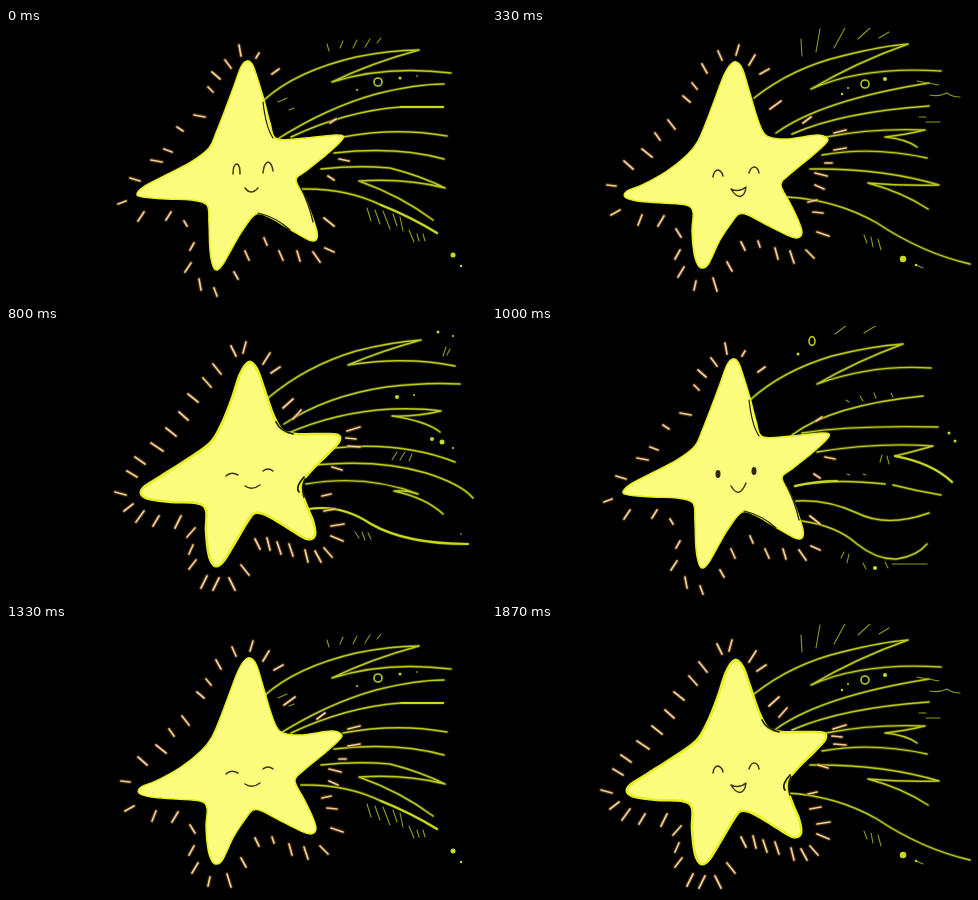
Write an HTML page that moves like this. It is 480 px wide and 270 px high and loops after 1990 ms.

```html
<!DOCTYPE html>
<html lang="en">
<head>
<meta charset="utf-8">
<title>Shooting star</title>
<style>
html, body { margin: 0; width: 100%; height: 100%; overflow: hidden; background: #000; }
svg { display: block; width: 100%; height: 100%; }
path { fill: none; stroke-linecap: round; stroke-linejoin: round; }
.trail .glow { stroke: #6c7400; stroke-width: 3.2; opacity: .5; }
.trail .line { stroke: #bccb1c; stroke-width: 1.4; }
.trail .bold { stroke: #c9da1e; stroke-width: 2.2; }
.trail .tick { stroke: #8e9a18; stroke-width: 1.1; }
.trail .dot { stroke: #c9da1e; }
.spark .glow { stroke: #7a4a14; stroke-width: 4; opacity: .5; }
.spark .line { stroke: #f0d09a; stroke-width: 1.7; }
.body { fill: #fcfc7c; stroke: #e6f01c; }
.gap { stroke: #1c1c00; }
.face path { stroke: #3b3810; stroke-width: 1.5; }
.face .eye { fill: #2c2a0c; stroke: none; }
</style>
</head>
<body>
<svg viewBox="0 0 480 270" preserveAspectRatio="none"></svg>
<script>
const NS = 'http://www.w3.org/2000/svg';
const svg = document.querySelector('svg');

function add(parent, tag, attrs) {
  const el = document.createElementNS(NS, tag);
  for (const key in attrs) el.setAttribute(key, attrs[key]);
  return parent.appendChild(el);
}
const path = (g, cls, d, width) => {
  const el = add(g, 'path', { class: cls, d });
  if (width) el.style.strokeWidth = width;
};
const layer = cls => add(svg, 'g', { class: cls, visibility: 'hidden' });

// Closed smooth curve through a few points
function blob(text) {
  const v = text.split(/[ ,]+/).map(Number), n = v.length / 2;
  const at = (i, k) => v[((i + n) % n) * 2 + k];
  let d = `M${v[0]} ${v[1]}`;
  for (let i = 0; i < n; i++) {
    const c = [];
    for (const k of [0, 1]) {
      c[k] = at(i, k) + (at(i + 1, k) - at(i - 1, k)) / 6;
      c[k + 2] = at(i + 1, k) - (at(i + 2, k) - at(i, k)) / 6;
    }
    d += `C${c} ${at(i + 1, 0)} ${at(i + 1, 1)}`;
  }
  return d + 'Z';
}

// dots: [x, y, diameter]
function makeTrail({ lines, bold, ticks, dots, ring }) {
  const g = layer('trail');
  path(g, 'glow', lines + bold);
  path(g, 'line', lines);
  path(g, 'bold', bold);
  path(g, 'tick', ticks);
  for (const [x, y, size] of dots) path(g, 'dot', `M${x} ${y}h.01`, size);
  if (ring) add(g, 'ellipse', { cx: ring[0], cy: ring[1], rx: ring[2], ry: ring[3],
    fill: 'none', stroke: '#bccb1c', 'stroke-width': 1.6 });
  return g;
}

function makeStar({ shape, edge, gap, gapWidth, sparks }) {
  const g = layer('star');
  const s = add(g, 'g', { class: 'spark' });
  path(s, 'glow', sparks);
  path(s, 'line', sparks);
  path(g, 'body', blob(shape), edge);
  if (gap) path(g, 'gap', gap, gapWidth);
  return g;
}

function makeFace({ lines, eyes = [] }) {
  const g = layer('face');
  path(g, '', lines);
  for (const [cx, cy] of eyes) add(g, 'ellipse', { class: 'eye', cx, cy, rx: 2.5, ry: 3.9 });
  return g;
}

const trails = [
  {
    lines: 'M258 72Q290 43 350 29Q385 22 413 22Q365 35 326 54Q380 37 445 45' +
      'M270 112Q320 80 370 66Q410 56 438 56M285 109Q340 83 395 79L437 79' +
      'M337 109Q390 99 441 108M328 125Q390 118 438 131' +
      'M315 141Q350 137 384 140Q415 148 439 160Q400 150 353 153Q395 168 427 192' +
      'M295 161Q340 160 375 177',
    bold: 'M395 79L437 79M375 177Q405 189 431 205',
    ticks: 'M321 16l2 7M337 13l-3 7M351 12l-4 8M364 11l-5 8M371 15l4 -5' +
      'M361 180l4 13M369 182l5 14M377 183l7 18M387 186l4 12M394 189l3 14' +
      'M403 202l5 12M411 206l2 7M417 206l2 7M272 74l9 -4M283 82l5 -2',
    dots: [[394, 50, 3], [351, 62, 2], [411, 48, 1.6], [447, 227, 5], [455, 238, 2.4]],
    ring: [372, 54, 4, 4]
  },
  {
    lines: 'M262 70Q300 40 350 28Q390 18 416 16Q365 34 319 61Q370 38 449 43' +
      'M284 105Q330 72 437 55M300 106Q350 84 437 78' +
      'M334 109Q380 100 433 102Q412 107 393 109Q414 111 425 119' +
      'M330 127Q380 118 435 130M318 141Q390 140 447 157Q410 158 376 155Q410 164 436 181' +
      'M295 169Q345 172 385 195Q430 225 478 236',
    bold: '',
    ticks: 'M309 11l1 17M328 1l-4 23M353 0l-11 20M378 0l-12 11M387 10l10 -6' +
      'M425 53l22 4M438 67q8 2 17 -2q5 4 13 4M427 89h7M434 94h14' +
      'M372 207l3 8M379 209l2 10M386 211l3 11M424 237l7 3',
    dots: [[393, 51, 4], [356, 60, 2], [350, 66, 2.4], [411, 231, 6.5], [424, 237, 2.6]],
    ring: [373, 56, 4, 4]
  },
  {
    lines: 'M262 72Q300 40 350 25Q385 16 415 14Q375 25 342 39Q400 30 449 40' +
      'M278 98Q320 70 380 61Q420 56 454 58' +
      'M280 108Q330 86 385 83Q415 82 435 85Q410 91 386 90Q420 95 434 106' +
      'M328 122Q395 115 449 136M300 140Q370 132 420 147Q455 158 467 172' +
      'M300 158Q360 148 412 168Q400 164 388 165Q420 172 437 188',
    bold: 'M303 183Q335 178 365 198Q400 218 462 218',
    ticks: 'M440 21l-3 9M444 23l-3 6M391 126l-5 8M399 126l-5 8M406 128l-3 7' +
      'M349 206l4 6M356 206l3 8M362 207l3 6',
    dots: [[432, 6, 3], [447, 10, 2], [391, 71, 4], [408, 69, 2],
      [426, 113, 4], [436, 116, 5], [447, 122, 2], [455, 208, 1.6]]
  },
  {
    lines: 'M258 74Q290 45 340 30Q380 20 411 18Q365 35 325 58Q380 38 439 42' +
      'M300 109Q340 79 431 70M310 107Q360 99 446 101' +
      'M325 126Q385 116 441 120Q420 126 403 130' +
      'M303 160Q340 152 393 158M401 159Q425 165 449 169' +
      'M304 175Q335 173 365 187Q395 202 437 187' +
      'M310 195Q345 200 365 218Q385 234 405 233Q425 230 435 218',
    bold: 'M403 130Q440 137 460 156M303 160Q325 155 345 155',
    ticks: 'M343 8l12 -9M372 7l13 -8M354 74l3 2M368 70l3 5M382 67l2 5M399 67l2 4' +
      'M390 129l-2 7M395 130l2 8M355 148l3 1M371 148l3 1M352 226l-3 6M357 228l-2 9' +
      'M371 237l3 6M393 236l3 6M400 238h35',
    dots: [[306, 28, 3], [457, 107, 3], [463, 115, 3], [383, 242, 4]],
    ring: [320, 15, 3, 4.4]
  }
].map(makeTrail);

const stars = [
  {
    shape: '241 33,235 39,228 58,219 82,210 105,203 120,185 134,160 147,139 158,131 166,' +
      '137 169,160 171,185 172,201 177,203 195,204 222,207 238,211 242,217 236,225 222,' +
      '236 203,250 186,265 190,285 202,303 212,310 212,311 204,306 188,299 170,290 152,' +
      '300 143,320 127,335 113,337 108,329 107,300 110,271 111,264 95,258 72,250 46,246 36',
    edge: 1.6,
    gap: 'M257 74Q260 100 267 110M252 185Q270 189 284 202M294 158Q303 176 307 194',
    gapWidth: 1.2,
    sparks: 'M233 17l2 11M253 25l-3 5M219 32l6 8M206 44l8 7M273 41l-7 5M202 59l5 5' +
      'M188 87l11 2M171 99l6 4M158 121l8 3M145 132l11 2M124 150l10 3M112 176l8 -3' +
      'M138 184l-6 9M165 184l-5 8M178 193l3 5M188 215l-4 7M185 235l-6 9M193 251l2 11' +
      'M208 260l3 8M228 244l4 7M239 223l4 9M258 210l3 7M273 223l4 9M291 223l3 10' +
      'M307 224l7 10M319 220l9 4M318 190l10 8M322 148l6 4M333 131l10 2M324 95l6 -4'
  },
  {
    shape: '242 34,233 45,224 68,215 92,206 113,195 127,175 143,150 157,135 163,133 169,' +
      '145 173,170 175,194 177,201 184,200 203,202 225,206 237,211 240,217 235,228 212,' +
      '240 194,247 186,256 187,275 197,295 207,305 210,310 205,307 194,298 175,289 157,' +
      '297 147,320 128,334 115,335 110,325 107,295 111,277 109,270 102,264 86,257 62,250 40',
    edge: 1.5,
    sparks: 'M247 17l-3 10M226 23l4 9M263 27l-6 10M277 41l-9 5M210 36l5 9M200 55l5 6' +
      'M191 68l7 6M176 92l7 9M163 105l5 7M150 121l10 8M132 133l9 8M115 157l9 1' +
      'M119 187l9 -5M150 187l-4 10M172 188l-6 10M184 201l5 8M188 222l-5 9M192 239l-6 10' +
      'M204 253l-2 9M221 250l4 13M235 234l5 9M249 214l4 8M266 213l2 6M283 220l3 11' +
      'M298 223l4 12M314 222l8 8M325 204l12 4M321 184l10 1M316 174l9 -2M323 157l9 4' +
      'M323 145l12 3M333 135l7 0M342 122l12 -2M342 105l12 -3M311 95l8 -6M289 73l-11 8'
  },
  {
    shape: '243 36,234 48,226 72,216 97,204 117,180 134,155 150,138 161,135 168,143 173,' +
      '165 176,190 177,200 184,200 205,203 230,209 240,217 236,230 215,242 195,249 187,' +
      '262 190,285 204,301 213,309 209,307 195,300 178,295 159,305 145,322 128,333 116,' +
      '332 109,318 108,290 108,276 104,267 88,258 62,251 43',
    edge: 2.6,
    gap: 'M270 96Q274 105 287 108M298 151Q289 161 293 166M299 153Q295 160 298 171',
    gapWidth: 1.7,
    sparks: 'M240 16l-3 11M225 20l5 10M264 27l-7 11M274 41l-9 6M207 38l8 10M197 52l8 9' +
      'M182 68l10 8M173 86l9 8M160 102l10 8M145 117l12 8M129 131l10 7M121 145l10 6' +
      'M109 166l11 3M118 185l9 -7M138 185l-8 11M153 190l-6 10M175 190l-6 12M189 202l-8 9' +
      'M187 219l-4 9M190 234l-7 9M201 250l-6 12M213 252l-6 12M223 252l6 12M235 239l8 10' +
      'M249 213l5 10M261 212l3 12M271 216l4 12M283 218l4 12M299 224l3 12M309 225l6 11' +
      'M318 222l8 9M325 210l12 5M325 200l13 -2M318 185l11 -2M316 170l9 -2' +
      'M326 141l10 3'
      + 'M342 120l12 1M341 105l13 -4M340 112l10 1M295 84l-8 9M277 82l10 -9'
  }
].map(makeStar);

const faces = [
  { lines: 'M227 146Q227 136 231 136Q234 137 234 146M257 145Q258 135 262 134Q266 135 267 143' +
      'M239 160Q245 168 252 160' },
  { lines: 'M221 149Q222 142 226 142Q230 143 231 148M257 145Q259 139 262 139Q266 139 267 145' +
      'M239 161Q247 165 254 159Q253 168 248 168.500Q243 168 239 161' },
  { lines: 'M220 150Q225 145 232 149M257 145Q262 141 267 145M239 160Q246 165 254 159' },
  { lines: 'M239 160Q247 174 254 157', eyes: [[226, 148], [262, 145]] }
].map(makeFace);

// Star, trail and face drawings run on their own cycles
const LOOP = 1990;
const starts = [0, 330, 670, 1000, 1330, 1670];
const faceOrder = [0, 1, 2, 3, 2, 1];
const show = (list, pick) =>
  list.forEach((g, i) => g.setAttribute('visibility', i === pick ? 'visible' : 'hidden'));

let shown = -1;
function draw() {
  const t = performance.now() % LOOP;
  const pose = starts.filter(s => s <= t).length - 1;
  if (pose !== shown) {
    show(trails, pose % 4);
    show(stars, pose % 3);
    show(faces, faceOrder[pose]);
    shown = pose;
  }
  requestAnimationFrame(draw);
}
draw();
</script>
</body>
</html>
```
